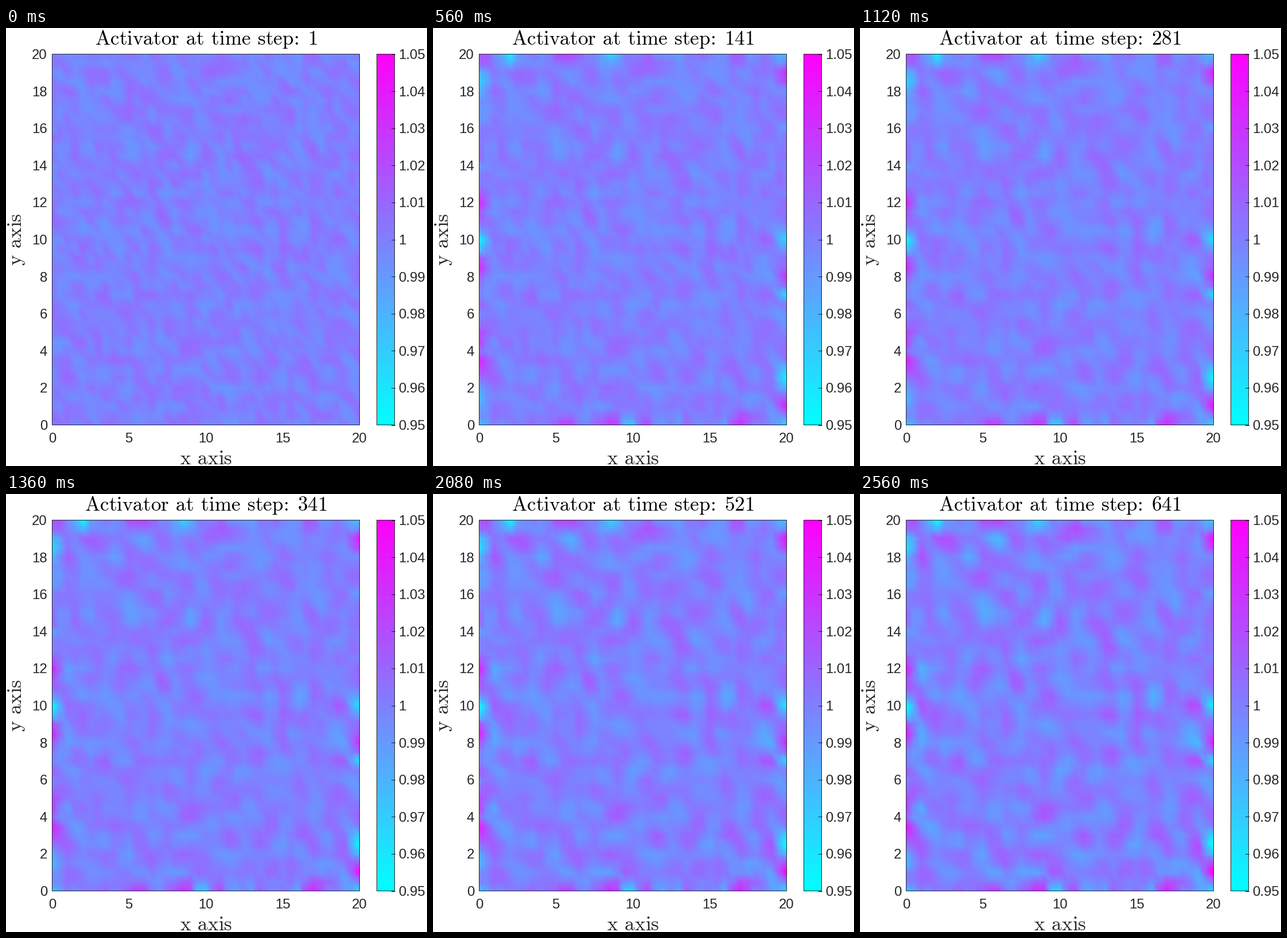
Recreate the animation shown at these times as a matplotlib script. Size 734 px wide and 763 px high, loop 2640 ms.

```python
import numpy as np
import matplotlib.pyplot as plt
from matplotlib.animation import FuncAnimation
from matplotlib.patches import Rectangle

W, H, DPI = 734, 763, 100
FRAMES, INTERVAL = 33, 80
LEFT, RIGHT, TOP, BOTTOM = 80.5, 616.5, 45.5, 691.5
BAR_L, BAR_R = 646.5, 677.5
INK = "#262626"
SIZE, N = 20, 41

plt.rcParams["font.family"] = "Liberation Sans"
plt.rcParams["mathtext.fontset"] = "cm"

axis = np.linspace(0, SIZE, N)
X, Y = np.meshgrid(axis, axis)
rng = np.random.default_rng(7)

# Random start, seen as waves so that each wavelength can grow or fade.
start = np.fft.fft2(rng.uniform(-0.009, 0.009, (N, N)))
freq = np.fft.fftfreq(N, SIZE / (N - 1))
Q = np.hypot(*np.meshgrid(freq, freq))
GROWTH, DAMPING, BEST = 0.8, 10, 0.43


def waves(s):
    gain = np.exp((s + 0.15) * (GROWTH - DAMPING * (Q - BEST) ** 2))
    return np.fft.ifft2(start * gain).real


def bell(d, width):
    return np.exp(-(d / width) ** 2 / 2)


def wall(highs, lows, along, depth):
    """Return the spots on one border and their opposite halo inside it."""
    ripple = np.interp(along, axis, rng.normal(0, 0.005, N))
    spots = ripple + 0.036 * (sum(bell(along - p, 0.42) for p in highs)
                              - sum(bell(along - p, 0.42) for p in lows))
    return spots * bell(depth, 0.38), -0.45 * spots * bell(depth - 1.05, 0.35)


walls = [
    wall((12.1, 8.6, 4.6, 3.3), (18.4, 10, 1.5), Y, X),
    wall((19, 7.8, 1), (10, 7.2, 2.5), Y, SIZE - X),
    wall((0, 5.8), (2, 8.4, 20), X, SIZE - Y),
    wall((5.7, 8.6, 10.8, 17), (0, 9.7, 20), X, Y),
]
edges, halo = (sum(parts) for parts in zip(*walls))

# Pixel positions inside the mesh, for linear shading over triangles.
cols = (np.arange(537) + 0.5) / 537 * (N - 1)
rows = (np.arange(647) + 0.5) / 647 * (N - 1)
CI, RI = np.meshgrid(cols.astype(int), rows.astype(int))
U, V = np.meshgrid(cols % 1, rows % 1)
LOWER = U + V <= 1


def shade(z):
    a, b = z[RI, CI], z[RI, CI + 1]
    c, d = z[RI + 1, CI], z[RI + 1, CI + 1]
    return np.where(LOWER, a + U * (b - a) + V * (c - a),
                    d + (1 - U) * (c - d) + (1 - V) * (b - d))


def field(k):
    s = k / (FRAMES - 1)
    z = 1 + waves(s)
    if k > 0:
        z = z + edges * (0.95 + 0.12 * s) + halo * s
    return shade(z)


def roman(text):
    """Set words in upright Computer Modern with text-style spacing."""
    words = [r"\mathrm{%s}" % w for w in text.split()]
    tex = r"\hspace{0.4}".join(words)
    colon = r":}\hspace{0.4}"
    return "$" + tex.replace(colon, r"}\hspace{-0.2}\mathrm{:}\hspace{0.3}") + "$"


fig = plt.figure(figsize=(W / DPI, H / DPI), dpi=DPI, facecolor="white")
ax = fig.add_axes([0, 0, 1, 1])
ax.axis("off")


def label(x, y, text, px=24, color=INK, ha="center", **kw):
    return ax.text(x, y, text, fontsize=px * 72 / DPI, color=color,
                   ha=ha, va="baseline", **kw)


def frame_box(x0, x1):
    ax.add_patch(Rectangle((x0, TOP), x1 - x0, BOTTOM - TOP, fill=False,
                           ec=INK, lw=0.72, zorder=3, snap=False))


def picture(data, x0, x1):
    return ax.imshow(data, extent=(x0 - 0.5, x1 + 0.5, BOTTOM + 0.5, TOP - 0.5),
                     cmap="cool", vmin=0.95, vmax=1.05, aspect="auto",
                     origin="lower", interpolation="nearest")


image = picture(field(0), LEFT, RIGHT)
picture(np.linspace(0.95, 1.05, 256)[:, None], BAR_L, BAR_R)
ax.set_xlim(0, W)
ax.set_ylim(H, 0)
frame_box(LEFT, RIGHT)
frame_box(BAR_L, BAR_R)

for i in range(11):
    y = BOTTOM - i * (BOTTOM - TOP) / 10
    label(72, y + 8.5, str(2 * i), ha="right")
    label(684.5, y + 8.5, f"{0.95 + i / 100:.4g}", ha="left")
    ax.plot([BAR_R - 6, BAR_R], [y, y], color=INK, lw=0.72, zorder=3)
for i in range(5):
    label(LEFT + i * (RIGHT - LEFT) / 4, 722.5, str(5 * i))

label(348.5, 760, roman("x axis"), 35.2)
label(27, 368, roman("y axis"), 35.2, rotation=90, rotation_mode="anchor")
title = label(348.5, 29, "", 35.2, "black")


def update(k):
    image.set_data(field(k))
    title.set_text(roman(f"Activator at time step: {1 + 20 * k}"))
    return image, title


anim = FuncAnimation(fig, update, frames=FRAMES, interval=INTERVAL,
                     repeat=True, repeat_delay=0, blit=False)
plt.show()
```
